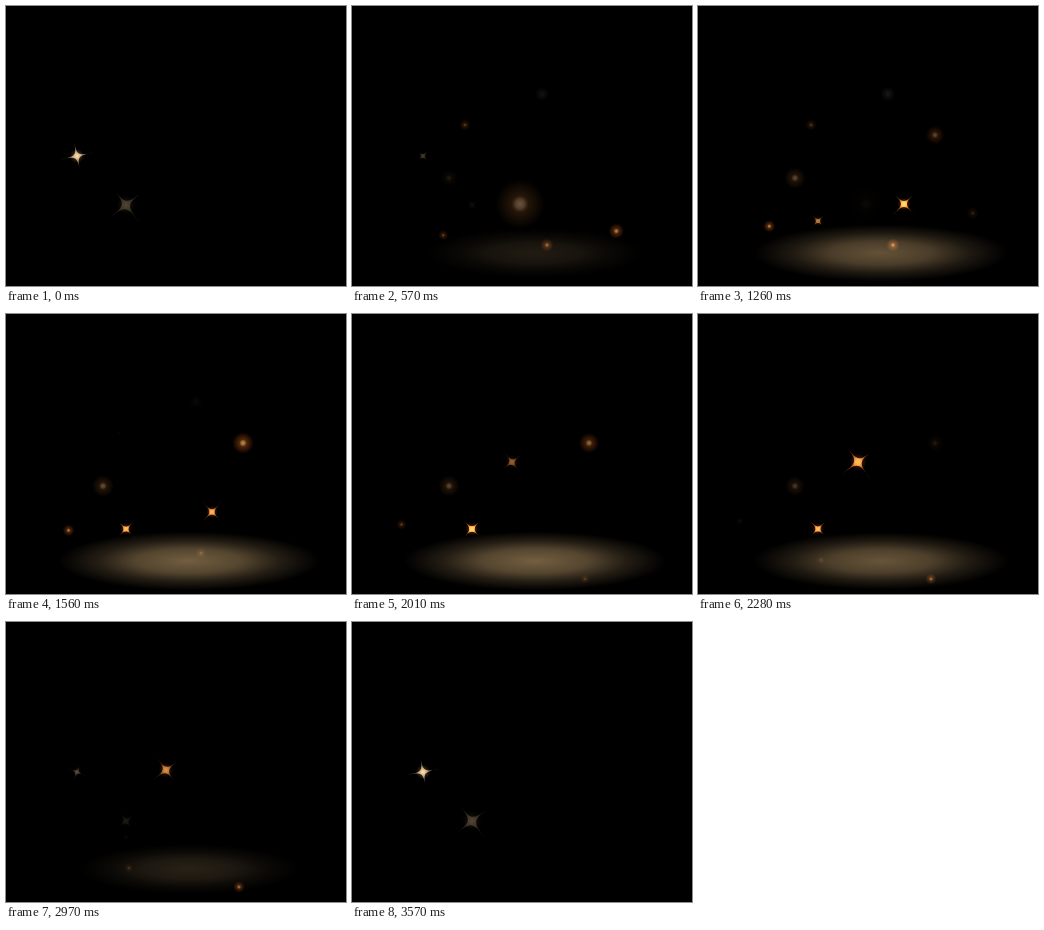
Animation, 340 px wide and 280 px high, one loop 3.6 s. Source, as an HTML page with a canvas:

```html
<!DOCTYPE html>
<html>
<head>
<meta charset="utf-8">
<style>
html, body { margin: 0; width: 100%; height: 100%; overflow: hidden; background: #000; }
canvas { display: block; }
</style>
</head>
<body>
<canvas id="stage" width="340" height="280"></canvas>
<script>
const ctx = document.getElementById('stage').getContext('2d');
const LOOP = 3600, STEP = 30;

// Each palette holds a core and a rim colour.
const ember = ['255,190,95', '195,85,22'];
const dusk = ['150,115,80', '90,52,20'];
const sand = ['205,178,138', '180,148,108'];
const ash = ['66,68,60', '64,64,57'];

// Every light swells and fades once between born and born + life.
const stars = [
  { x: 71, y: 150, born: 2800, life: 1500, size: 18, glow: .9, angle: -12, spin: -.055, palette: sand },
  { x: 120, y: 199, born: 2800, life: 1450, size: 24, glow: .28, angle: -38, palette: sand },
  { x: 206, y: 198, born: 650, life: 1300, size: 17, glow: 1, angle: -45, palette: ember },
  { x: 120, y: 215, born: 850, life: 2150, size: 16, glow: 1, angle: -45, palette: ember },
  { x: 160, y: 148, born: 1800, life: 1500, size: 24, glow: 1, angle: -37, palette: ember }
];

const dots = [
  { x: 97, y: 172, born: 300, life: 2650, size: 11, glow: .7, palette: dusk },
  { x: 168, y: 198, born: 50, life: 1250, size: 25, glow: .75, palette: dusk },
  { x: 113, y: 119, born: 200, life: 1400, size: 6, glow: .45, palette: ember },
  { x: 190, y: 88, born: 250, life: 1450, size: 8, glow: .5, palette: ash },
  { x: 195, y: 239, born: 150, life: 1550, size: 7, glow: .7, palette: ember },
  { x: 237, y: 129, born: 1050, life: 1300, size: 11, glow: .8, palette: ember },
  { x: 233, y: 265, born: 1850, life: 1650, size: 6, glow: .75, palette: ember },
  { x: 123, y: 246, born: 2150, life: 1000, size: 5, glow: .4, palette: ember },
  { x: 102, y: 234, vx: -.029, vy: -.013, born: 200, life: 2150, size: 6, glow: .75, palette: ember },
  { x: 258, y: 236, vx: .015, vy: -.026, born: 150, life: 1200, size: 8, glow: .8, palette: ember }
];

const floor = { x: 183, y: 247, born: 300, life: 3000, size: 132, glow: 1 };

// Stops are [position, colour, opacity].
function radial(r, stops) {
  const g = ctx.createRadialGradient(0, 0, 0, 0, 0, r);
  stops.forEach(([at, color, alpha]) => g.addColorStop(at, `rgba(${color},${alpha})`));
  return g;
}

function disc(r, stops) {
  ctx.fillStyle = radial(r, stops);
  ctx.beginPath();
  ctx.arc(0, 0, r, 0, 7);
  ctx.fill();
}

function drawFloor(light, swell) {
  const color = '118,97,66';
  ctx.scale(1, .225);
  disc(light.size * (.75 + .25 * swell),
       [[0, color, 1], [.4, color, .74], [.7, color, .3], [1, color, 0]]);
}

function drawDot({ size, palette: [core, rim] }, swell) {
  disc(size * (.7 + .3 * swell),
       [[0, core, 1], [.18, core, .75], [.35, rim, .55], [.7, rim, .25], [1, rim, 0]]);
}

function drawStar({ size, angle, spin = 0, palette: [core, rim] }, swell, age) {
  const r = size * (.4 + .6 * swell);
  ctx.rotate((angle + spin * (age - 800)) * Math.PI / 180);
  disc(r * .4, [[0, rim, .5], [.5, rim, .28], [1, rim, 0]]);
  ctx.fillStyle = radial(r, [[0, core, 1], [.15, core, .9], [.35, rim, .9], [.7, rim, .7], [1, rim, .2]]);
  ctx.beginPath();
  ctx.moveTo(r, 0);
  for (let k = 1; k <= 4; k++) {
    const a = k * Math.PI / 2;
    ctx.bezierCurveTo(0, 0, 0, 0, r * Math.cos(a), r * Math.sin(a));
  }
  ctx.fill();
}

function place(light, t, draw) {
  const age = (t - light.born + LOOP) % LOOP;
  if (age >= light.life) return;
  const swell = Math.sin(Math.PI * age / light.life);
  const { x, y, vx = 0, vy = 0 } = light;
  ctx.save();
  ctx.globalAlpha = light.glow * swell;
  ctx.translate(x + vx * age, y + vy * age);
  draw(light, swell, age);
  ctx.restore();
}

function frame(now) {
  const t = Math.floor(now % LOOP / STEP) * STEP;
  ctx.globalCompositeOperation = 'source-over';
  ctx.fillStyle = '#000';
  ctx.fillRect(0, 0, 340, 280);
  ctx.globalCompositeOperation = 'lighter';
  place(floor, t, drawFloor);
  dots.forEach(dot => place(dot, t, drawDot));
  stars.forEach(star => place(star, t, drawStar));
}

const start = performance.now();
(function tick() {
  frame(performance.now() - start);
  requestAnimationFrame(tick);
})();
</script>
</body>
</html>
```
